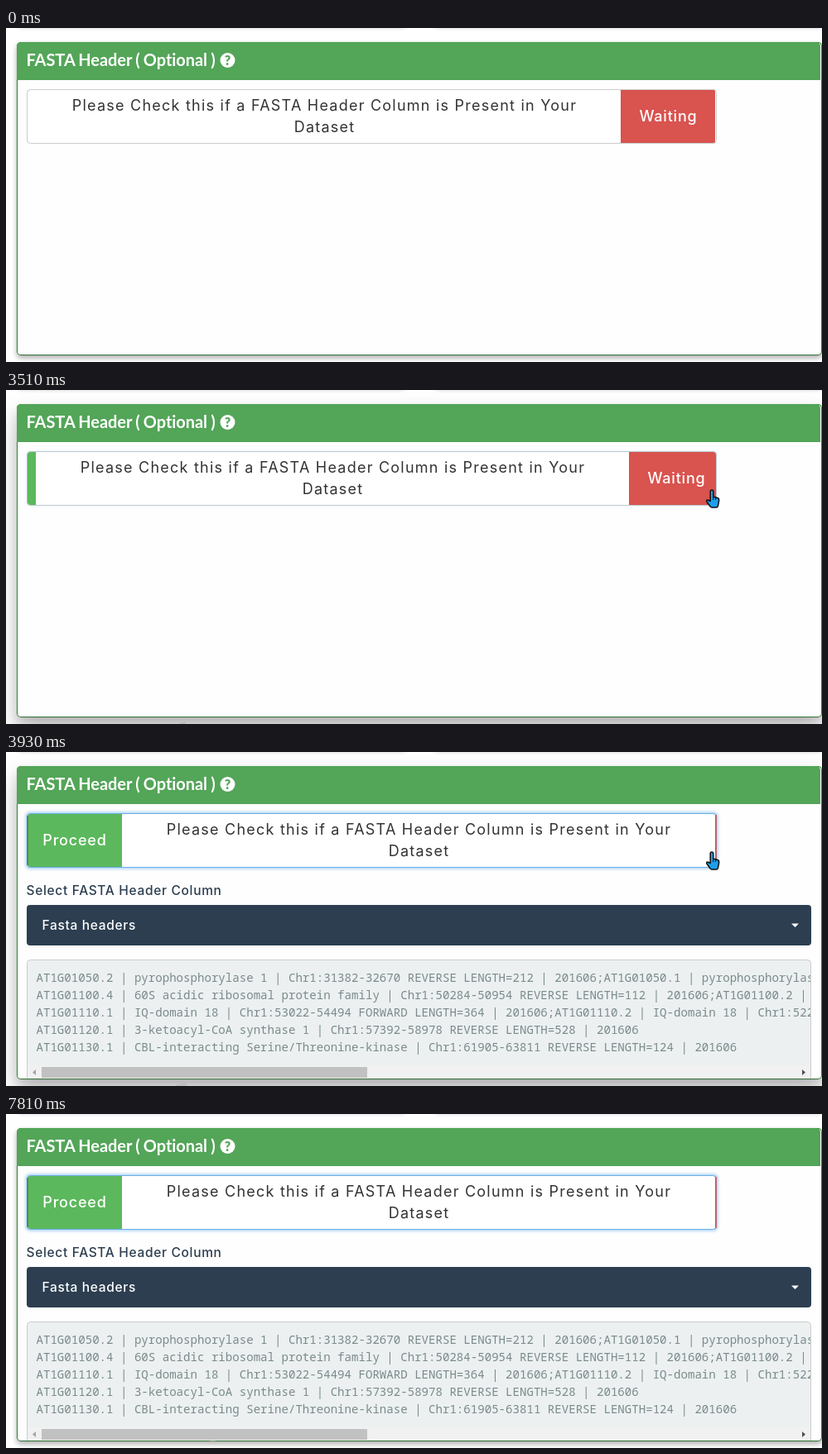
An HTML page for the animation above (7950 ms loop, 985 by 404 pixels).

```html
<!DOCTYPE html>
<html lang="en">
<head>
<meta charset="utf-8">
<title>FASTA header switch</title>
<style>
  html, body { margin: 0; width: 100%; height: 100%; overflow: hidden; background: #fff; }
  #stage { position: relative; width: 985px; height: 404px; overflow: hidden; }
  #stage > * { position: absolute; }
  .above { top: -40px; height: 37px; width: 470px; border-radius: 5px;
    box-shadow: 0 2px 5px rgba(0,0,0,.16), 0 2px 6px rgba(0,0,0,.12); }
  #card { left: 13px; top: 17px; width: 970px; height: 377px; background: #fefefe;
    border: 1px solid #228b22; border-bottom-color: #2f6f38; border-radius: 5px; }
  svg { left: 0; top: 0; }
  text { white-space: pre; }
  .title { font: 700 20px Lato, sans-serif; letter-spacing: -.05px; word-spacing: -.6px; fill: #fff; }
  .label { font: 400 18px Inter, sans-serif; letter-spacing: 1.23px; fill: #333; text-anchor: middle; }
  .state { font: 500 18px Inter, sans-serif; letter-spacing: .8px; fill: #fff; text-anchor: middle; }
  .field { font: 500 15.5px Inter, sans-serif; letter-spacing: .68px; fill: #2c3e50; }
  #rows text { font: 400 14.1px "Noto Sans Mono", monospace; fill: #7b8a8b; }
</style>
</head>
<body>
<div id="stage">
  <div class="above" style="left:13px"></div>
  <div class="above" style="left:516px"></div>
  <div id="card"></div>
  <svg width="985" height="404" viewBox="0 0 985 404">
    <defs>
      <clipPath id="switchClip"><rect x="25.5" y="74.5" width="832" height="65" rx="4"/></clipPath>
      <clipPath id="preClip"><rect x="26" y="252" width="945" height="143"/></clipPath>
      <filter id="blur" x="-5%" y="-30%" width="110%" height="160%"><feGaussianBlur stdDeviation="1.8"/></filter>
    </defs>

    <path id="sliver" d="M-8 6L-6 3L6 -1L8 5Z"/>

    <path d="M13 63V22a5 5 0 0 1 5-5H978a5 5 0 0 1 5 5V63Z" fill="#53a558"/>
    <text class="title" x="24.5" y="46">FASTA Header ( Optional )</text>
    <circle cx="267.5" cy="39" r="9" fill="#fff"/>
    <text x="267.5" y="44.8" text-anchor="middle" font-family="Lato, sans-serif" font-weight="900" font-size="16" fill="#53a558">?</text>

    <rect id="glow" x="25" y="74" width="833" height="66" rx="4" fill="none" stroke="#66afe9" stroke-width="4" filter="url(#blur)"/>
    <g clip-path="url(#switchClip)">
      <rect x="25" y="74" width="833" height="66" fill="#fff"/>
      <g id="slider">
        <rect x="-88" y="74" width="114" height="66" fill="#5cb85c"/>
        <text class="state" x="-31" y="113">Proceed</text>
        <text class="label" x="384.5" y="100">Please Check this if a FASTA Header Column is Present in Your</text>
        <text class="label" x="384.5" y="126">Dataset</text>
        <rect x="742" y="74" width="114" height="66" fill="#d9534f"/>
        <text class="state" x="799.5" y="113">Waiting</text>
      </g>
    </g>
    <rect x="25.5" y="74.5" width="832" height="65" rx="4" fill="none" stroke="#ccc"/>
    <g id="focus">
      <rect x="25.5" y="74.5" width="832" height="65" rx="4" fill="none" stroke="#66afe9"/>
      <path d="M26 77V137" stroke="#2f5f4a"/>
    </g>
    <path id="redEdge" d="M857 76V138" stroke="#d9534f" stroke-width="1.6"/>

    <g id="panel">
      <text class="field" x="24.5" y="173">Select FASTA Header Column</text>
      <rect x="25" y="185" width="947" height="49" rx="4" fill="#2c3e50"/>
      <text class="field" x="43.5" y="214.5" style="fill:#fff">Fasta headers</text>
      <path d="M948 207.5H957L952.5 212Z" fill="#fff"/>
      <path d="M25.5 395V255.5a4 4 0 0 1 4-4H967.5a4 4 0 0 1 4 4V395" fill="#ecf0f1" stroke="#ccc"/>
      <g id="rows" clip-path="url(#preClip)"></g>
      <rect x="26" y="379" width="945" height="16" fill="#f1f1f1"/>
      <rect x="43" y="381" width="393" height="13" fill="#c1c1c1"/>
      <path d="M36 384V391L32 387.5Z" fill="#a3a3a3"/>
      <path d="M961 384V391L965 387.5Z" fill="#505050"/>
    </g>

    <g id="cursor" stroke="#111" stroke-width="1.5" stroke-linejoin="round">
      <path fill="#1e9fee" d="M-1.8 2Q-1.8 0 0 0Q1.8 0 1.8 2V8L7 9.5Q9 10 8.6 13L7.4 19.3Q7 21 5.5 21H0Q-1 21 -2 19.8L-6 14.2Q-7 12 -5 12L-1.8 13.5Z"/>
      <path d="M1.8 8V12M4.6 9V12" stroke-width="1.1"/>
    </g>
  </svg>
</div>
<script>
const LOOP = 7950, STEP = 70, CLICK = 3440, TRAVEL = 114;
const $ = id => document.getElementById(id);

[
  'AT1G01050.2 | pyrophosphorylase 1 | Chr1:31382-32670 REVERSE LENGTH=212 | 201606;AT1G01050.1 | pyrophosphorylase',
  'AT1G01100.4 | 60S acidic ribosomal protein family | Chr1:50284-50954 REVERSE LENGTH=112 | 201606;AT1G01100.2 | ',
  'AT1G01110.1 | IQ-domain 18 | Chr1:53022-54494 FORWARD LENGTH=364 | 201606;AT1G01110.2 | IQ-domain 18 | Chr1:522',
  'AT1G01120.1 | 3-ketoacyl-CoA synthase 1 | Chr1:57392-58978 REVERSE LENGTH=528 | 201606',
  'AT1G01130.1 | CBL-interacting Serine/Threonine-kinase | Chr1:61905-63811 REVERSE LENGTH=124 | 201606'
].forEach((line, i) => {
  const row = document.createElementNS('http://www.w3.org/2000/svg', 'text');
  row.setAttribute('x', 36.5);
  row.setAttribute('y', 277.5 + 21 * i);
  row.textContent = line;
  $('rows').append(row);
});

const progress = (t, start, length) => Math.min(1, Math.max(0, (t - start) / length));
const mix = (a, b, p) => a + (b - a) * p;
const smooth = p => p * p * (3 - 2 * p);

// CSS "ease": cubic-bezier(.25, .1, .25, 1), solved by bisection
function ease(x) {
  const bezier = (a, b, s) => 3 * a * s * (1 - s) ** 2 + 3 * b * s * s * (1 - s) + s ** 3;
  let lo = 0, hi = 1;
  for (let i = 0; i < 20; i++) {
    const mid = (lo + hi) / 2;
    if (bezier(.25, .25, mid) < x) lo = mid; else hi = mid;
  }
  return bezier(.1, 1, lo);
}

// Each key is [time, x, y]
function along(keys, t, curve = p => p) {
  if (t <= keys[0][0]) return keys[0].slice(1);
  const next = keys.findIndex(k => k[0] > t);
  if (next < 0) return keys.at(-1).slice(1);
  const a = keys[next - 1], b = keys[next];
  const p = curve((t - a[0]) / (b[0] - a[0]));
  return [mix(a[1], b[1], p), mix(a[2], b[2], p)];
}

const cursorPath = [
  [280, 1000, 170], [1000, 846, 117], [1110, 846, 117], [1340, 649, 89],
  [2130, 649, 89], [2810, 848, 110], [3230, 848, 110], [3300, 852, 110],
  [3370, 852, 110], [3440, 852, 121], [4210, 852, 121], [4630, 1000, 175]
];
const sliverPath = [
  [2200, 212, 404], [3510, 210, 402], [3930, 211, 400],
  [5300, 225, 398], [6080, 234, 397], [7810, 249, 394]
];

function draw(t) {
  t = CLICK + Math.floor((t - CLICK) / STEP) * STEP;

  const lift = ease(progress(t, 290, 350)) - ease(progress(t, 4480, 350));
  const shadow = (y, blur, alpha) => `0 ${y}px ${blur}px rgba(0,0,0,${alpha})`;
  $('card').style.boxShadow =
    shadow(mix(3, 14, lift), mix(6, 28, lift), mix(.16, .25, lift)) + ',' +
    shadow(mix(3, 6, lift), mix(6, 10, lift), mix(.2, .1, lift));

  const slide = Math.round(TRAVEL * ease(progress(t, CLICK + 27, 460)));
  $('slider').setAttribute('transform', `translate(${slide})`);
  const focus = ease(progress(t, CLICK + 40, 250));
  $('focus').setAttribute('opacity', focus);
  $('glow').setAttribute('opacity', focus * .45);
  $('redEdge').setAttribute('opacity', slide === TRAVEL ? 1 : 0);
  $('panel').setAttribute('visibility', t >= CLICK + 2 * STEP ? 'visible' : 'hidden');

  $('cursor').setAttribute('transform', `translate(${along(cursorPath, t, smooth)})`);

  const [x, y] = along(sliverPath, t);
  const fade = progress(t, 4200, 3600);
  $('sliver').setAttribute('transform', `translate(${x} ${y}) scale(${mix(1, .6, fade)})`);
  $('sliver').setAttribute('fill', `rgb(${mix(185, 220, fade)},185,185)`);
  $('sliver').setAttribute('opacity', t < 2200 ? 0 : mix(.8, .3, fade));
}

const begin = performance.now();
function tick() {
  draw((performance.now() - begin) % LOOP);
  requestAnimationFrame(tick);
}
tick();
</script>
</body>
</html>
```
